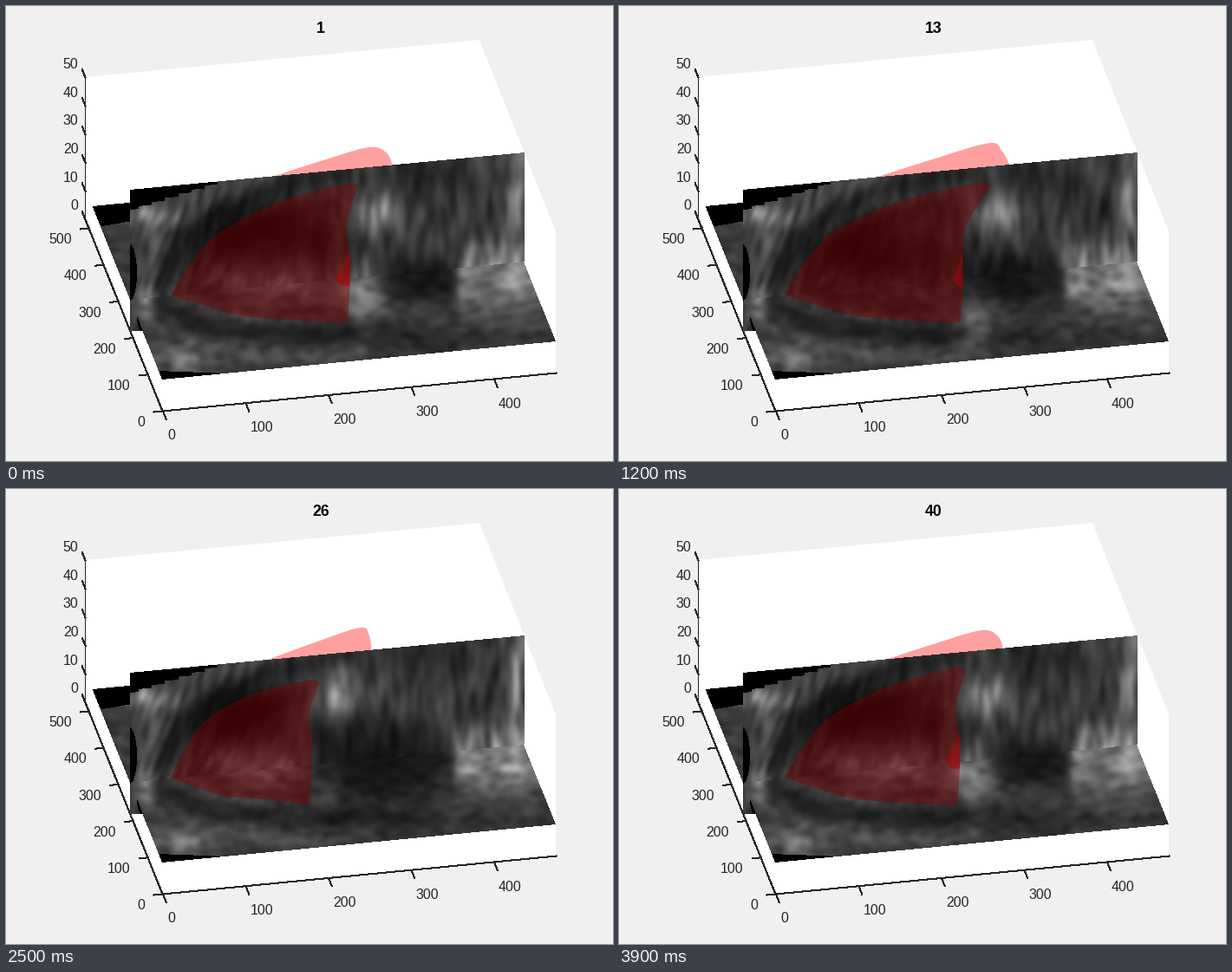
Recreate the animation shown at these times as a matplotlib script. Size 700 px wide and 525 px high, loop 4000 ms.

```python
import numpy as np
import matplotlib.pyplot as plt
from matplotlib.animation import FuncAnimation
from matplotlib.patches import Polygon
from matplotlib.path import Path

W, H, DPI = 700, 525, 100
FRAMES, INTERVAL = 40, 100
PX = 72 / DPI
INK = "#262626"

# Chamber outline at mid beat.
TOP = [(190, 333), (213, 295), (237, 266), (278, 242), (322, 225), (380, 211), (396, 213)]
RIGHT = [TOP[-1], (379, 255), (380, 288), (380, 328), (377, 365)]
BOTTOM = [RIGHT[-1], (323, 361), (263, 356), (225, 345), TOP[0]]


def beat(i):
    """Size of the chamber (-1..1) and its lagging companion."""
    a = 2 * np.pi * (i - 6) / FRAMES
    return np.cos(a), np.sin(a)


def stretch(pts, s, q):
    """Pull points away from the fixed apex; upper ones rise and lag."""
    x, y = np.array(pts, float).T
    far = (x - 190) / 190
    up = np.clip((288 - y) / 75, 0, 1)
    bulge = 5 * far * np.sin(np.pi * far) * (up == 0)
    return np.column_stack([
        x + far * (28 + 6 * up) * s + 12 * up * far**2 * q,
        y + (bulge - 10 * up * np.sqrt(far)) * s,
    ])


def curve(pts, steps=8):
    """Open Catmull-Rom curve through the points."""
    p = np.array([pts[0], *pts, pts[-1]], float)
    u = np.linspace(0, 1, steps, endpoint=False)[:, None]
    parts = []
    for a, b, c, d in zip(p, p[1:], p[2:], p[3:]):
        parts.append(0.5 * (2*b + (c - a)*u + (2*a - 5*b + 4*c - d)*u**2
                            + (3*b - a - 3*c + d)*u**3))
    return np.vstack(parts + [p[-1:]])


def wall_shape(s, q):
    return np.vstack([curve(stretch(p, s, q)) for p in (TOP, RIGHT, BOTTOM)])


def slice_top(x):
    return 212 - 0.0945 * (x - 143)


def back_shape(s, q):
    """The part that rises behind the upright slice."""
    left, right = 303 - 7 * q, 438 + 17 * s + 3 * q
    peak = np.array([417 + 10 * s + 5 * q, 160.5 - 3 * q])
    start, end = (left, slice_top(left)), (right, slice_top(right))
    middle = (peak + start) / 2 - (0, 1)
    shoulder = (432 + 14 * s + 2 * q, 168.5 - q)
    return np.vstack([curve([start, middle, peak, shoulder, end]),
                      np.add(end, (0, 4)), np.add(start, (0, 4))])


def fold_shape(s, q):
    """Thin strip where the right wall overlaps itself."""
    width = max(8 + 11 * s - 4 * q, 0)
    rim = curve(stretch(RIGHT, s, q))
    rim = rim[(rim[:, 1] > 280) & (rim[:, 1] < 328)]
    inner = [rim[-1] - (width * 0.5, 0), rim[-1] - (width, 7)]
    return np.vstack([rim, inner])


# Pixel grid of the textured area
X0, X1, Y0, Y1 = 90, 640, 160, 440
X, Y = np.meshgrid(np.arange(X0, X1) + 0.5, np.arange(Y0, Y1) + 0.5)
rng = np.random.default_rng(5)


def noise(across, along, tilt=0.0):
    """Smooth unit noise with an elongated grain."""
    fy = np.fft.fftfreq(X.shape[0])[:, None]
    fx = np.fft.fftfreq(X.shape[1])[None, :]
    a = fx * np.cos(tilt) + fy * np.sin(tilt)
    b = fy * np.cos(tilt) - fx * np.sin(tilt)
    blur = np.exp(-2 * np.pi**2 * ((across * a)**2 + (along * b)**2))
    n = np.fft.ifft2(np.fft.fft2(rng.standard_normal(X.shape)) * blur).real
    return n / n.std()


def blob(x, y, rx, ry):
    return np.exp(-((X - x) / rx)**2 / 2 - ((Y - y) / ry)**2 / 2)


def step(v, soft):
    return 1 / (1 + np.exp(-np.clip(v / soft, -30, 30)))


def inside(pts):
    grid = np.column_stack([X.ravel(), Y.ravel()])
    return Path(pts).contains_points(grid).reshape(X.shape)


FLOOR = inside([(99.5, 231), (553.5, 187), (634, 387), (180, 431)])
UPRIGHT = inside([(143, 212), (598, 169), (598, 295), (143, 339)])
FLAP = inside([(143, 338), (158, 375), (143, 375)])
WALL_SIDE = UPRIGHT | FLAP


def build_base():
    """Still tissue: a dark and a bright ring round the chamber, plus spots."""
    gap = np.full(X.shape, 1e9)
    for x, y in wall_shape(0, 0)[::2]:
        gap = np.minimum(gap, np.hypot(X - x, Y - y))
    rings = 16 * np.exp(-((gap - 42) / 10)**2) - 20 * np.exp(-((gap - 17) / 12)**2)
    g = 56 + rings * step(410 - X, 15)
    g += 70 * blob(162, 241, 20, 9) + 60 * blob(163, 335, 7, 14)
    g += 60 * blob(198, 407, 22, 11) - 20 * blob(207, 378, 18, 10)
    g += 60 * blob(590, 220, 10, 50) + 35 * blob(575, 315, 34, 22)
    g += 35 * blob(533, 318, 9, 13) - 22 * blob(490, 195, 40, 16)
    g -= 20 * blob(440, 380, 70, 10)
    return g


def build_black():
    depth = np.ceil(22 * (1 - (X - 143) / 101) / 3.3) * 3.3
    corner = UPRIGHT & (X < 246) & (Y - slice_top(X) < depth)
    back = (X < 143) & (Y < 254 - 0.17 * (X - 111))
    front = inside([(174, 421), (257, 424), (257, 426), (180, 433)])
    hole = WALL_SIDE & (((X - 142) / 9)**2 + ((Y - 308) / 33)**2 < 1)
    edge = FLAP & (((X - 158) / 7)**2 + ((Y - 358) / 18)**2 < 1)
    return corner | back | front | hole | edge


def grain():
    """Streaks on the upright slice, finer and weaker speckle on the floor."""
    mix = step(X - 330, 25)
    streaks = (1 - mix) * noise(2.8, 8, 0.35) + mix * noise(3.2, 10)
    return np.where(WALL_SIDE, 0.17 * streaks, 0.12 * noise(5, 3.4))


BASE, BLACK = build_base(), build_black()
STILL, WAVES = grain(), [grain() for _ in range(4)]
DRIFT = 0.25 + 0.6 * step(X - 260, 30)


def picture(i, s, q):
    tip, right, corner = (stretch(RIGHT, s, q)[k, 0] for k in (0, 2, 4))
    g = BASE.copy()

    # Bright block on the right and the dark cavity beside it.
    beyond = step(X - 518 + 5 * q, 2.5)
    g += 40 * beyond * step(Y - 275, 4) * (1 - step(Y - 345, 10))
    cx, rx, ry = 452 + 22 * s - 15 * q, 57 - 17 * s + 8 * q, 30 - 9 * s + 4 * q
    cavity = np.exp(-(((X - cx) / rx)**2 + ((Y - 316) / ry)**2)**1.6 / 2.2)
    g *= 1 - 0.62 * cavity * (1 - beyond)

    # Blood in the chamber: dark core above, glow below.
    glow = 28 - 14 * s - 18 * q
    mid, half = (195 + right) / 2, 0.42 * (right - 190)
    core_y = 292 - 0.6 * glow
    core = np.exp(-(((X - mid) / half)**2 + ((Y - core_y) / 45)**2)**1.5)
    g *= 1 - 0.82 * core
    g += 1.2 * glow * np.exp(-((X - mid - 20) / 65)**2 - ((Y - 322) / 32)**2)

    # Bright valve and the patch below it.
    g += 85 * blob((tip + right) / 2 + 23, 239, 20, 17) * WALL_SIDE
    g += (45 + 25 * s - 12 * q) * blob(corner + 18, 348 + 18 * q, 17, 20)

    a = 2 * np.pi * i / FRAMES
    move = (np.cos(a) * WAVES[0] + np.sin(a) * WAVES[1]
            + np.cos(3 * a) * WAVES[2] + np.sin(3 * a) * WAVES[3]) / np.sqrt(2)
    g = np.clip(g * (1 + np.sqrt(1 - DRIFT**2) * STILL + DRIFT * move), 4, 225)
    g[BLACK] = 0
    img = np.empty(X.shape + (4,), np.uint8)
    img[..., :3] = g[..., None]
    img[..., 3] = 255 * (FLOOR | WALL_SIDE)
    return img


fig = plt.figure(figsize=(W / DPI, H / DPI), dpi=DPI, facecolor="#f0f0f0")
ax = fig.add_axes([0, 0, 1, 1])
ax.axis("off")


def line(*pts):
    x, y = np.add(pts, 0.5).T
    ax.plot(x, y, color=INK, lw=PX, antialiased=False, zorder=1.5)


def label(x, y, s, ha, size=16, color=INK, **style):
    return ax.text(x, y + 0.34 * size, s, ha=ha, va="baseline", color=color,
                   fontsize=size * PX, family="Liberation Sans", **style)


ax.add_patch(Polygon([(91, 82), (546, 39), (634, 260), (634, 423),
                      (180, 467), (91, 246)], fc="white", ec="none", zorder=1))
line((91, 82), (91, 246), (180, 467), (634, 423))

for k in range(6):
    z = 246 - 32.8 * k
    line((91, z), (87.3, z - 9.2))
    label(83.5, 230 - 32.7 * k, str(10 * k), "right")
    x, y = 180 - 16.9 * k, 467 - 42.2 * k
    line((x, y), (x - 10, y + 1))
    label(160.5 - 16.8 * k, 480 - 42.3 * k, str(100 * k), "right")
for k in range(5):
    x, y = 180.5 + 95.5 * k, 467 - 9.25 * k
    line((x, y), (x + 3.7, y + 9.2))
    label(186 + 95.5 * k, 495 - 9 * k, str(100 * k), "left")

title = label(363, 25, "1", "center", size=17.6, color="black", weight="bold")
blank = np.zeros((3, 2))
back = ax.add_patch(Polygon(blank, fc="#ffa0a0", ec="none", zorder=2))
scan = ax.imshow(np.zeros(X.shape + (4,), np.uint8), extent=(X0, X1, Y1, Y0),
                 interpolation="nearest", aspect="auto", zorder=3)
wall = ax.add_patch(Polygon(blank, fc="#820000", ec="none", alpha=0.42, zorder=4))
fold = ax.add_patch(Polygon(blank, fc="#b00408", ec="none", alpha=0.5, zorder=5))
ax.set_xlim(0, W)
ax.set_ylim(H, 0)


def update(i):
    s, q = beat(i)
    scan.set_data(picture(i, s, q))
    wall.set_xy(wall_shape(s, q))
    fold.set_xy(fold_shape(s, q))
    back.set_xy(back_shape(s, q))
    title.set_text(str(i + 1))
    return scan, wall, fold, back, title


anim = FuncAnimation(fig, update, frames=FRAMES, interval=INTERVAL,
                     repeat=True, repeat_delay=0, blit=False)
plt.show()
```
